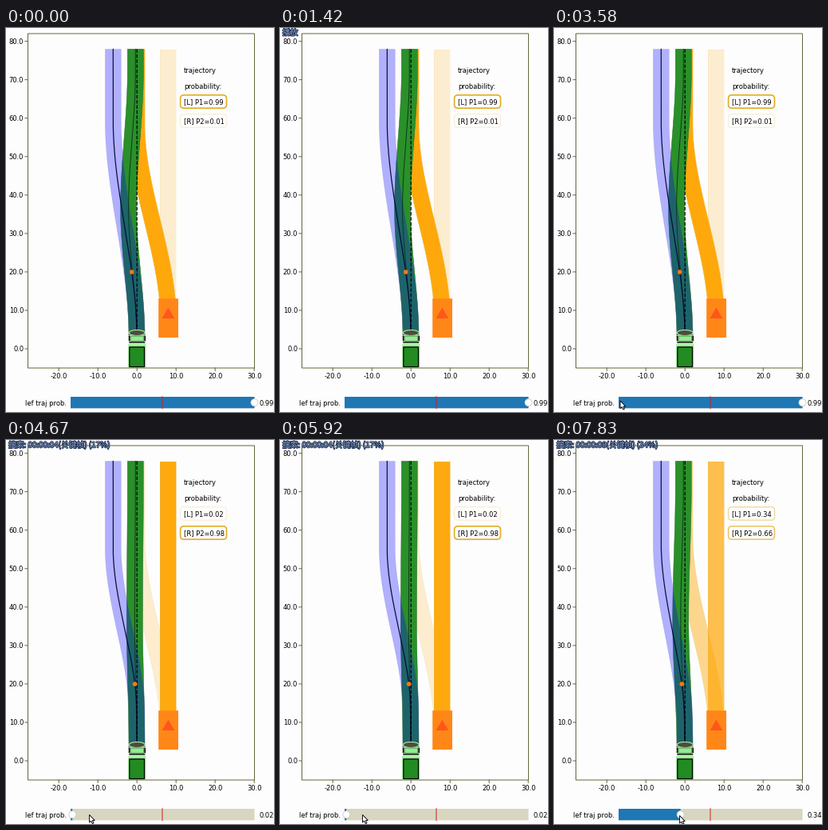
Write a matplotlib script that moves like this. It is 336 by 480 pixels and loops after 8000 ms.

```python
import numpy as np
import matplotlib.pyplot as plt
from matplotlib.animation import FuncAnimation
from matplotlib.patches import Circle, Ellipse, FancyBboxPatch, Polygon, Rectangle
from matplotlib.patheffects import withStroke

W, H, DPI = 336, 480, 100
PX = 72 / DPI
LOOP, STEP = 8000, 40
FONT = 6
ORANGE, GREEN, BLUE, FRAME = "#ffa80a", "#2a902a", "#1f77b4", "#66663a"
MID, TOP, FRONT = 164.2, 26.5, 386

plt.rcParams["font.family"] = "DejaVu Sans"
fig = plt.figure(figsize=(W / DPI, H / DPI), dpi=DPI, facecolor="#fdfdfe")
ax = fig.add_axes([0, 0, 1, 1])
ax.set_xlim(0, W)
ax.set_ylim(H, 0)
ax.axis("off")


def line(x, y, color="black", lw=1.0, z=5, **kw):
    return ax.plot(x, y, color=color, lw=lw * PX, zorder=z, snap=False, **kw)[0]


def rect(x0, y0, x1, y1, fc, ec="none", lw=1.0, z=3):
    return ax.add_patch(Rectangle((x0, y0), x1 - x0, y1 - y0, fc=fc, ec=ec,
                                  lw=lw * PX, zorder=z, snap=False))


def text(x, y, s, ha="left", z=8, **kw):
    return ax.text(x, y, s, ha=ha, va="center_baseline", zorder=z,
                   **{"fontsize": FONT, "color": "black", **kw})


def ease(u):
    u = np.clip(u, 0, 1)
    return u * u * (3 - 2 * u)


def band(x, y, color, edge, z, alpha=1.0, half=10):
    m = np.gradient(x, y)
    n = half / np.hypot(1, m)
    pts = np.concatenate([np.c_[x - n, y + m * n], np.c_[x + n, y - m * n][::-1]])
    fill = ax.add_patch(Polygon(pts, fc=color, ec="none", alpha=alpha, zorder=z))
    rim = ax.add_patch(Polygon(pts, fc="none", ec=edge, lw=0.5 * PX,
                               alpha=alpha, zorder=z))
    return [fill, rim]


def draw_plot():
    rect(27.5, 7, 311.5, 425, "none", FRAME, z=7)
    for v in range(0, 90, 10):
        y = 401 - 4.805 * v
        line([24, 27.5], [y, y], FRAME)
        text(22.2, y, f"{v:.1f}", "right")
    for v in range(-20, 40, 10):
        x = MID + 4.9 * v
        line([x, x], [425, 428.5], FRAME)
        text(x, 434, f"{v:.1f}", "center")
    line([MID, MID], [TOP, 378], lw=1.2, dashes=(3.7, 1.6))
    text(222.8, 53, "trajectory")
    text(222.8, 72, "probability:")


def draw_vehicles():
    rect(191.2, 338.2, 216, 387, "#ff8718", z=4)
    ax.add_patch(Polygon([(195.5, 363), (211.3, 363), (203.4, 349.5)],
                         fc="#ff561c", zorder=5))
    # truck: windscreen, cab and box
    rect(154, 384, 175, 398, "#dcfad4", z=6)
    ax.add_patch(Ellipse((MID, 381), 20, 7, fc="#4c4c40", ec="#b4ee9c",
                         lw=1.1 * PX, zorder=6))
    rect(156, 385, 172.8, 391.3, "#90ee90", "#3c5c3c", 0.7, z=6)
    for x in (154.6, 174.2):
        line([x, x], [385.5, 390.5], lw=1.6, z=6)
    line([155, 173.5], [393, 393], lw=1.4, z=6)
    rect(153.2, 395.3, 175.3, 424.3, "#98ee90", z=6)
    rect(154.8, 398.8, 173.5, 423.5, "#228b22", "black", 1.2, z=6)


def draw_slider_base():
    text(76.2, 468, "lef traj prob.", "right")
    rect(81, 461, 311.5, 475.3, "#d8d6c0", z=3)
    line([196, 196], [460.7, 475.7], "#d02020", z=5)


def slider_x(p):
    return 81 + 230.5 * (p - 0.01) / 0.98


def strength(p):
    return 0.18 + 0.82 * p


def prob_box(y, label, p):
    box = FancyBboxPatch((221.8, y - 5), 51.5, 10,
                         boxstyle="round,pad=3.2,rounding_size=4.5", fc="white",
                         ec=(0.88, 0.68, 0.14, strength(p)),
                         lw=(1.2 + 0.5 * p) * PX, zorder=7)
    return [ax.add_patch(box), text(222.8, y, label)]


def draw_scene(p):
    """Everything that depends on the probability p of the left trajectory."""
    arts = []
    y = np.linspace(TOP, 350, 120)
    merge = 164 + 39.5 * ease((y - 120) / 245)
    straight = np.full_like(y, 203.3)
    for x, q in ((merge, p), (straight, 1 - p)):
        arts += band(x, y, ORANGE, "#e8b840", 1 + q, strength(q))

    # the likelier the merge, the earlier and wider the truck swerves
    y = np.linspace(TOP, FRONT, 160)
    start, end, bend = 340 + 46 * p, 135 - 20 * p, 2.5 + 8 * p
    swerve = 164 - 29.7 * ease((start - y) / (start - end))
    stay = 164 - bend * ease((FRONT - y) / 160) + (bend - 1.7) * ease((225 - y) / 170)
    arts += band(stay, y, GREEN, "#286c28", 3)
    arts += band(swerve, y, "#0000ff", "#6c6c9c", 3.2, 0.3)
    arts.append(line(stay, y, "#0c3c18", 1, 3.4))
    arts.append(line(swerve, y, "#080840", 1.2, 3.6))
    dot = np.interp(305, y, swerve)
    arts.append(ax.add_patch(Circle((dot, 305), 2.8, fc="#ff7810", zorder=6)))

    arts += prob_box(92, f"[L] P1={p:.2f}", p)
    arts += prob_box(116, f"[R] P2={1 - p:.2f}", 1 - p)
    x = slider_x(p)
    arts.append(rect(81, 461, x, 475.3, BLUE, z=4))
    arts.append(ax.add_patch(Circle((x, 468.2), 4.5, fc="white", ec="#ccccc0",
                                    lw=0.8 * PX, zorder=6)))
    arts.append(text(317, 468, f"{p:.2f}"))
    return arts


draw_plot()
draw_vehicles()
draw_slider_base()
scenes = [draw_scene(p) for p in (0.99, 0.02, 0.34)]

caption = text(3, 5, "", z=10, fontsize=9.8 * PX, color="#8ca4cc",
               fontfamily=["Noto Sans CJK JP", "DejaVu Sans"],
               path_effects=[withStroke(linewidth=1.6 * PX, foreground="#182848")])

ARROW = np.array([(0, 0), (0, 9.6), (2.2, 7.6), (3.8, 11), (5.4, 10.3),
                  (3.9, 7), (6.8, 7)])
cursor = ax.add_patch(Polygon(ARROW, fc="white", ec="black", lw=0.9 * PX, zorder=9))

CUTS = (3670, 6500)
SEEK = "搜索: {}(关键帧) ({}%)"


def caption_at(t):
    if t >= CUTS[1]:
        return SEEK.format("00:00:08", 34)
    if t >= CUTS[0]:
        return SEEK.format("00:00:04", 17)
    return "播放" if 500 <= t < 2500 else ""


def cursor_at(t):
    if t >= CUTS[1]:
        return 157.5, 469.5
    if t >= CUTS[0]:
        return 104.5 - (t >= 5830), 468.5
    enter, nudge = ease((t - 1830) / 320), ease((t - 2330) / 340)
    return 96 - 9 * enter - 4 * nudge, 482 - 14.5 * enter - 1.5 * nudge


def update(i):
    t = i * STEP + STEP / 2
    now = sum(t >= c for c in CUTS)
    for k, arts in enumerate(scenes):
        for a in arts:
            a.set_visible(k == now)
    caption.set_text(caption_at(t))
    cursor.set_xy(ARROW + cursor_at(t))
    cursor.set_visible(t >= 1830)
    return [caption, cursor]


anim = FuncAnimation(fig, update, frames=LOOP // STEP, interval=STEP,
                     init_func=lambda: update(0), repeat=True, repeat_delay=0)
plt.show()
```
